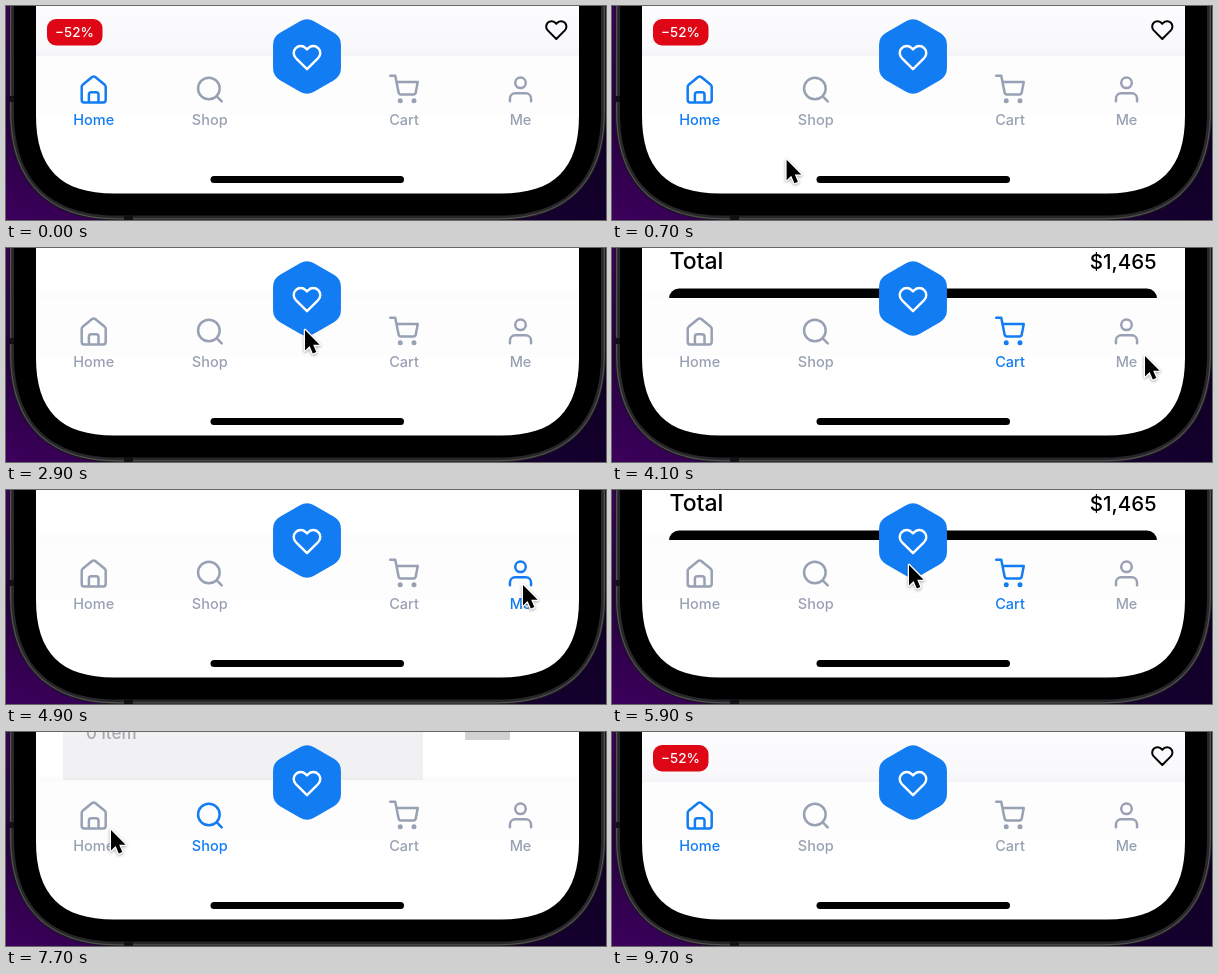
These frames come from a looping animation (600 by 214 pixels, 9900 ms). An HTML page with a canvas:

```html
<!DOCTYPE html>
<html lang="en">
<head>
<meta charset="utf-8">
<title>Tab bar</title>
<style>
  html, body { margin: 0; width: 100%; height: 100%; overflow: hidden; background: #000; }
  canvas { display: block; width: 600px; height: 214px; }
</style>
</head>
<body>
<canvas id="stage"></canvas>
<script>
const W = 600, H = 214, LOOP = 9900;
const BLUE = '#127df2', GRAY = '#98a1b3';
const canvas = document.getElementById('stage');
const dpr = window.devicePixelRatio || 1;
canvas.width = W * dpr;
canvas.height = H * dpr;
const ctx = canvas.getContext('2d');

const HEART = new Path2D('M20.84 4.61a5.5 5.5 0 0 0-7.78 0L12 5.67l-1.06-1.06a5.5 5.5 0 0 0-7.78 7.78l1.06 1.06L12 21.23l7.78-7.78 1.06-1.06a5.5 5.5 0 0 0 0-7.78z');
const ARROW = new Path2D('M0 0V23.5L5.3 18.5L9 27L13 25.3L9.4 17H16.8Z');

const TABS = [
  { page: 'home', label: 'Home', x: 87.7, y: 83.5, scale: 1.2,
    icon: new Path2D('M2 9.8Q2 8.8 2.8 8.1L10.7 1.6Q12 .6 13.3 1.6L21.2 8.1Q22 8.8 22 9.8V20.8Q22 22.8 20 22.8H4Q2 22.8 2 20.8ZM8 22.5V16.2Q8 14.2 10 14.2H14Q16 14.2 16 16.2V22.5') },
  { page: 'shop', label: 'Shop', x: 203.7, y: 83.7, scale: 1.2,
    icon: new Path2D('M20.3 11A9 9 0 1 1 2.3 11A9 9 0 1 1 20.3 11M17.7 17.4L22 21.8') },
  { page: 'cart', label: 'Cart', x: 398, y: 83.6, scale: 1.25,
    icon: new Path2D('M1 1h4l2.68 13.39a2 2 0 0 0 2 1.61h9.72a2 2 0 0 0 2-1.61L23 6H6M10 21a1 1 0 1 1-2 0a1 1 0 1 1 2 0M21 21a1 1 0 1 1-2 0a1 1 0 1 1 2 0') },
  { page: 'me', label: 'Me', x: 514.5, y: 83.4, scale: 1.32,
    icon: new Path2D('M20 21v-2a4 4 0 0 0-4-4H8a4 4 0 0 0-4 4v2M16 7a4 4 0 1 1-8 0a4 4 0 1 1 8 0') }
];

// [start time, page]
const VISITS = [
  [0, 'home'], [1200, 'shop'], [2450, 'liked'], [3500, 'cart'], [4400, 'me'],
  [5500, 'cart'], [6000, 'liked'], [6900, 'shop'], [7950, 'home']
];

// [time, x, y] of the pointer tip
const POINTER = [
  [400, 150, 216], [1000, 197, 88], [1500, 195, 85], [1750, 196, 85],
  [2250, 298, 80], [2950, 298, 80], [3350, 397, 90], [3600, 397, 90],
  [4100, 532, 106], [4350, 516, 93], [5200, 516, 93],
  [5450, 397, 90], [5600, 397, 90], [5900, 296, 73], [6300, 297, 73],
  [6750, 204, 88], [7300, 204, 88], [7700, 104, 96], [7900, 89, 91],
  [8150, 89, 91], [8600, 60, 216]
];

function box(x, y, w, h, radius, color) {
  ctx.beginPath();
  ctx.roundRect(x, y, w, h, radius);
  ctx.fillStyle = color;
  ctx.fill();
}

function text(str, x, y, size, color, align = 'left') {
  ctx.font = `500 ${size}px Inter, sans-serif`;
  ctx.textAlign = align;
  ctx.fillStyle = color;
  ctx.fillText(str, x, y);
}

// Icons are drawn on a 24-unit grid centred on (x, y).
function icon(path, x, y, scale, color, width) {
  ctx.save();
  ctx.translate(x, y);
  ctx.scale(scale, scale);
  ctx.translate(-12, -12);
  ctx.lineWidth = width / scale;
  ctx.lineCap = ctx.lineJoin = 'round';
  ctx.strokeStyle = color;
  ctx.stroke(path);
  ctx.restore();
}

function gradient(x0, y0, x1, y1, ...colors) {
  const g = ctx.createLinearGradient(x0, y0, x1, y1);
  colors.forEach((c, i) => g.addColorStop(i / (colors.length - 1), c));
  return g;
}

// Phone outline with continuous-curvature corners, grown outward from the screen edge.
function phoneShape(grow, color) {
  const left = 30 - grow, right = 573 + grow, bottom = 187.5 + grow;
  const extent = 78 + grow * 1.15;
  const handle = extent * (4 - 8 * (19 + grow * 0.33) / extent) / 3;
  const inner = extent - handle;
  ctx.beginPath();
  ctx.moveTo(left, -10);
  ctx.lineTo(left, bottom - extent);
  ctx.bezierCurveTo(left, bottom - inner, left + inner, bottom, left + extent, bottom);
  ctx.lineTo(right - extent, bottom);
  ctx.bezierCurveTo(right - inner, bottom, right, bottom - inner, right, bottom - extent);
  ctx.lineTo(right, -10);
  ctx.fillStyle = color;
  ctx.fill();
}

function drawPhone() {
  ctx.fillStyle = gradient(0, 0, W, 0, '#420064', '#22003f', '#14002e');
  ctx.fillRect(0, 0, W, H);
  ctx.fillStyle = gradient(0, 0, 0, H, 'rgba(10,0,25,.1)', 'rgba(10,0,25,.5)', 'rgba(10,0,25,.1)');
  ctx.fillRect(0, 0, W, H);

  phoneShape(27, '#19171b');
  phoneShape(26, '#525053');
  phoneShape(24.7, '#272629');
  phoneShape(22, '#000');
  ctx.fillStyle = '#111014';
  ctx.fillRect(3, 90, 5, 6);
  ctx.fillRect(118, 209, 9, 5);
  phoneShape(0, '#fff');
}

const PAGES = {
  home() {
    ctx.fillStyle = gradient(0, 0, 0, 50, '#fcfbfd', '#f8f7f9');
    ctx.fillRect(30, 0, 543, 50);
    box(41, 13, 55.5, 26.5, 9, '#df0615');
    text('\u221252%', 68.5, 31, 13.5, '#fff', 'center');
    icon(HEART, 550.3, 24, 0.97, '#000', 2);
  },
  shop() {
    ctx.fillStyle = '#f1f0f2';
    ctx.fillRect(57, 0, 360, 48);
    text('0 item', 80, 7, 17, '#a9a8ae');
    box(459, -5, 45, 13, 1, '#d2d1d2');
  },
  cart() {
    text('Total', 57.5, 21, 23, '#000');
    text('$1,465', 544.5, 21, 20.5, '#000', 'right');
    box(57, 40.5, 488, 20, 11, '#000');
  },
  liked() {},
  me() {}
};

function drawHexagon(cx, cy, size, radius) {
  const corner = i => {
    const a = (i * 60 - 90) * Math.PI / 180;
    return [cx + size * Math.cos(a), cy + size * Math.sin(a)];
  };
  const [ax, ay] = corner(0), [bx, by] = corner(1);
  ctx.beginPath();
  ctx.moveTo((ax + bx) / 2, (ay + by) / 2);
  for (let i = 1; i <= 6; i++) ctx.arcTo(...corner(i), ...corner(i + 1), radius);
  ctx.closePath();
  ctx.fillStyle = BLUE;
  ctx.fill();
}

function drawNav(page) {
  ctx.fillStyle = gradient(0, 40, 0, 50, 'rgba(90,80,100,0)', 'rgba(90,80,100,.025)');
  ctx.fillRect(30, 40, 543, 10);
  ctx.fillStyle = '#fefdfe';
  ctx.fillRect(30, 50, 543, 59);
  for (const tab of TABS) {
    const color = tab.page === page ? BLUE : GRAY;
    icon(tab.icon, tab.x, tab.y, tab.scale, color, 2.5);
    text(tab.label, tab.x, 118.7, 14.5, color, 'center');
  }
  drawHexagon(301, 50.5, 39.2, 14);
  icon(HEART, 301, 51.5, 1.27, '#fff', 2.4);
  box(204.5, 170, 193.5, 7, 3.5, '#000');
}

function drawPointer(t) {
  const next = POINTER.findIndex(p => p[0] > t);
  if (next < 1) return;
  const [t0, x0, y0] = POINTER[next - 1], [t1, x1, y1] = POINTER[next];
  const k = (t - t0) / (t1 - t0);
  const ease = k * k * (3 - 2 * k);
  ctx.save();
  ctx.translate(x0 + (x1 - x0) * ease + 1, y0 + (y1 - y0) * ease + 2);
  ctx.scale(0.87, 0.87);
  ctx.lineJoin = 'round';
  ctx.lineWidth = 3;
  ctx.strokeStyle = '#fff';
  ctx.shadowColor = 'rgba(0,0,0,.35)';
  ctx.shadowBlur = 3 * dpr;
  ctx.shadowOffsetY = dpr;
  ctx.stroke(ARROW);
  ctx.shadowColor = 'transparent';
  ctx.fillStyle = '#000';
  ctx.fill(ARROW);
  ctx.restore();
}

function render(t) {
  const page = VISITS.filter(v => v[0] <= t).pop()[1];
  ctx.setTransform(dpr, 0, 0, dpr, 0, 0);
  drawPhone();
  PAGES[page]();
  drawNav(page);
  drawPointer(t);
}

const start = performance.now();
function tick() {
  render((performance.now() - start) % LOOP);
  requestAnimationFrame(tick);
}
tick();
</script>
</body>
</html>
```
